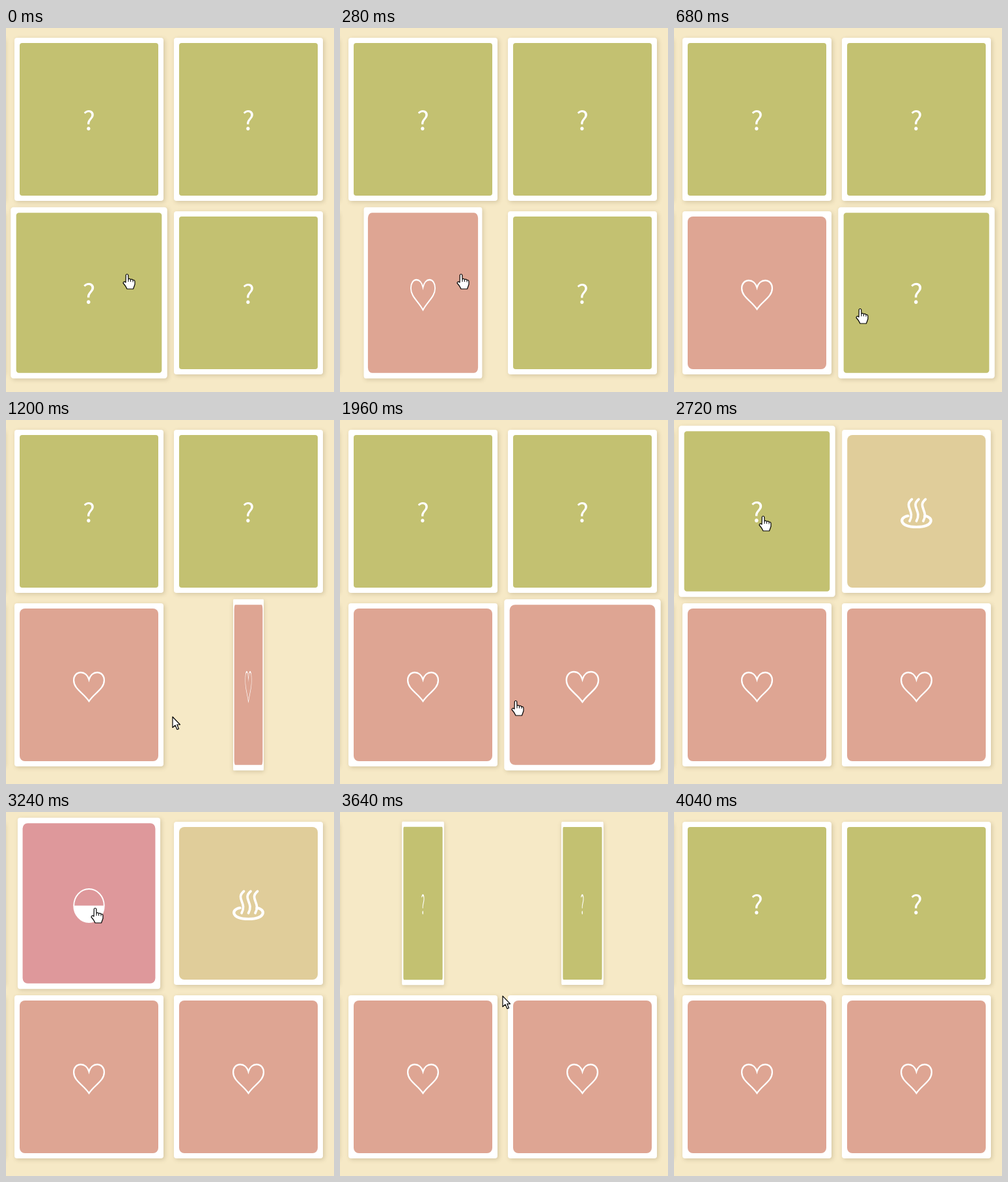
These frames come from a looping animation (504x558 px, 5320 ms). An HTML page with a canvas:

```html
<!DOCTYPE html>
<html lang="en">
<head>
<meta charset="utf-8">
<title>Memory cards</title>
<style>
  html, body { margin: 0; width: 504px; height: 558px; overflow: hidden; background: #f6e9c6; }
  canvas { display: block; }
</style>
</head>
<body>
<canvas width="504" height="558"></canvas>
<script>
const ctx = document.querySelector('canvas').getContext('2d');
const LOOP = 5320, W = 229, H = 250, BORDER = 8;
const NEVER = 1e9;

// Times in ms: flip up, flip back, hover start and hover end.
const cards = [
  { x: -117.5, y: 140, up: NEVER, back: NEVER, on: NEVER, off: NEVER },
  { x: -117.5, y: 406, up: NEVER, back: NEVER, on: NEVER, off: NEVER },
  { x: 127.5, y: 140, icon: drawHalf, color: '#de989b', up: 2955, back: 3470, on: 2500, off: 3550 },
  { x: 372.5, y: 140, icon: drawSprings, color: '#e0cd9a', up: 2310, back: 3470, on: 2060, off: 2480 },
  { x: 127.5, y: 406, icon: drawHeart, color: '#dea593', up: 45, back: NEVER, on: -1000, off: 400 },
  { x: 372.5, y: 406, icon: drawHeart, color: '#dea593', up: 1038, back: NEVER, on: 430, off: 2030 }
];

// Pointer stops: time, x, y
const stops = [
  [0, 186, 377], [300, 186, 377], [560, 286, 430], [680, 286, 430],
  [1000, 266, 452], [1200, 256, 455], [1640, 256, 455], [1720, 270, 430],
  [1960, 270, 430], [2160, 290, 190], [2440, 290, 190], [2660, 137, 147],
  [3460, 137, 147], [3620, 250, 270], [3800, 250, 590], [LOOP, 250, 590]
];

const heart = new Path2D('M0-8C-2-15-7-19-12.5-19C-19-19-23.4-14-23.4-7C-23.4 6-9 12 0 25C9 12 23.4 6 23.4-7C23.4-14 19-19 12.5-19C7-19 2-15 0-8Z');
const steam = new Path2D('M3.5-18.5C-10-7 9-1 0 15');
const bowl = new Path2D('M-13 7C-27 9-27 24 0 24C27 24 27 9 13 7');
const hand = new Path2D('M-1.7 1.5Q0-1 1.7 1.5L2 8Q4 6.5 5.5 8.5Q8 7.5 9 9.5Q12 9 12 12V16Q11 19 9.5 23H0Q-1.5 19-6 14Q-5.5 10.5-2 13Z');
const knuckles = new Path2D('M2 8v4M5.5 8.5v3.5M9 9.5v3');
const arrow = new Path2D('M0 0V16.5L4 13L7 19.5L9.5 18.5L6.8 12H11.5Z');

const clamp = v => Math.min(1, Math.max(0, v));

// The CSS "ease" curve, cubic-bezier(.25, .1, .25, 1)
function ease(v) {
  v = clamp(v);
  let lo = 0, hi = 1;
  for (let i = 0; i < 24; i++) {
    const s = (lo + hi) / 2;
    if (.75 * s * (1 - s) + s ** 3 < v) lo = s; else hi = s;
  }
  return .3 * lo * (1 - lo) ** 2 + 3 * lo * lo * (1 - lo) + lo ** 3;
}

function box(w, h, r, fill) {
  ctx.beginPath();
  ctx.roundRect(-w / 2, -h / 2, w, h, r);
  ctx.fillStyle = fill;
  ctx.fill();
}

function line(path, width) {
  ctx.lineWidth = width;
  ctx.stroke(path);
}

function drawHeart() {
  line(heart, 2.3);
}

function drawSprings() {
  ctx.lineCap = 'round';
  line(bowl, 4.2);
  for (const x of [-10.5, 0, 10.5]) {
    ctx.save();
    ctx.translate(x, 0);
    line(steam, 3.7);
    ctx.restore();
  }
}

function drawHalf() {
  ctx.lineWidth = 2;
  ctx.beginPath();
  ctx.arc(0, 3.3, 24.3, 0, 2 * Math.PI);
  ctx.stroke();
  ctx.beginPath();
  ctx.arc(0, 3.3, 24.3, 0, Math.PI);
  ctx.fill();
}

function pose(card, t) {
  const fade = start => ease((t - start) / 120);
  const turn = start => ease((t - start) / 500);
  return {
    scale: 1 + .05 * (fade(card.on) - fade(card.off)),
    cos: Math.cos(Math.PI * (turn(card.up) - turn(card.back)))
  };
}

function drawCard(card, t) {
  const { scale, cos } = pose(card, t), front = cos > 0;
  ctx.save();
  ctx.translate(card.x, card.y);
  ctx.scale(scale * Math.max(.002, Math.abs(cos)), scale);
  ctx.shadowColor = 'rgba(110, 90, 50, .24)';
  ctx.shadowBlur = 6;
  ctx.shadowOffsetX = 2 * Math.abs(cos);
  ctx.shadowOffsetY = 2;
  box(W, H, 4, '#fff');
  ctx.shadowColor = 'transparent';
  box(W - 2 * BORDER, H - 2 * BORDER, front ? 4 : 8, front ? '#c3c171' : card.color);
  ctx.fillStyle = ctx.strokeStyle = '#fff';
  if (front) {
    ctx.font = '500 40px "Noto Sans CJK JP", "Noto Sans CJK SC", "Noto Sans", sans-serif';
    ctx.textAlign = 'center';
    ctx.fillText('?', 0, 15.5);
  } else {
    card.icon();
  }
  ctx.restore();
}

function drawPointer(t) {
  const i = stops.findIndex(s => s[0] > t);
  const [t0, x0, y0] = stops[i - 1], [t1, x1, y1] = stops[i];
  const v = (t - t0) / (t1 - t0), k = v * v * (3 - 2 * v);
  const x = x0 + (x1 - x0) * k, y = y0 + (y1 - y0) * k;
  const over = cards.some(card => {
    const { scale, cos } = pose(card, t);
    return Math.abs(x - card.x) < W / 2 * scale * Math.abs(cos) && Math.abs(y - card.y) < H / 2 * scale;
  });
  ctx.save();
  ctx.translate(x, y);
  ctx.fillStyle = '#fff';
  ctx.strokeStyle = '#000';
  ctx.lineJoin = 'round';
  ctx.fill(over ? hand : arrow);
  line(over ? hand : arrow, 1.2);
  if (over) line(knuckles, 1);
  ctx.restore();
}

function draw() {
  const t = performance.now() % LOOP;
  ctx.fillStyle = '#f6e9c6';
  ctx.fillRect(0, 0, 504, 558);
  cards.forEach(card => drawCard(card, t));
  drawPointer(t);
  requestAnimationFrame(draw);
}
draw();
</script>
</body>
</html>
```
